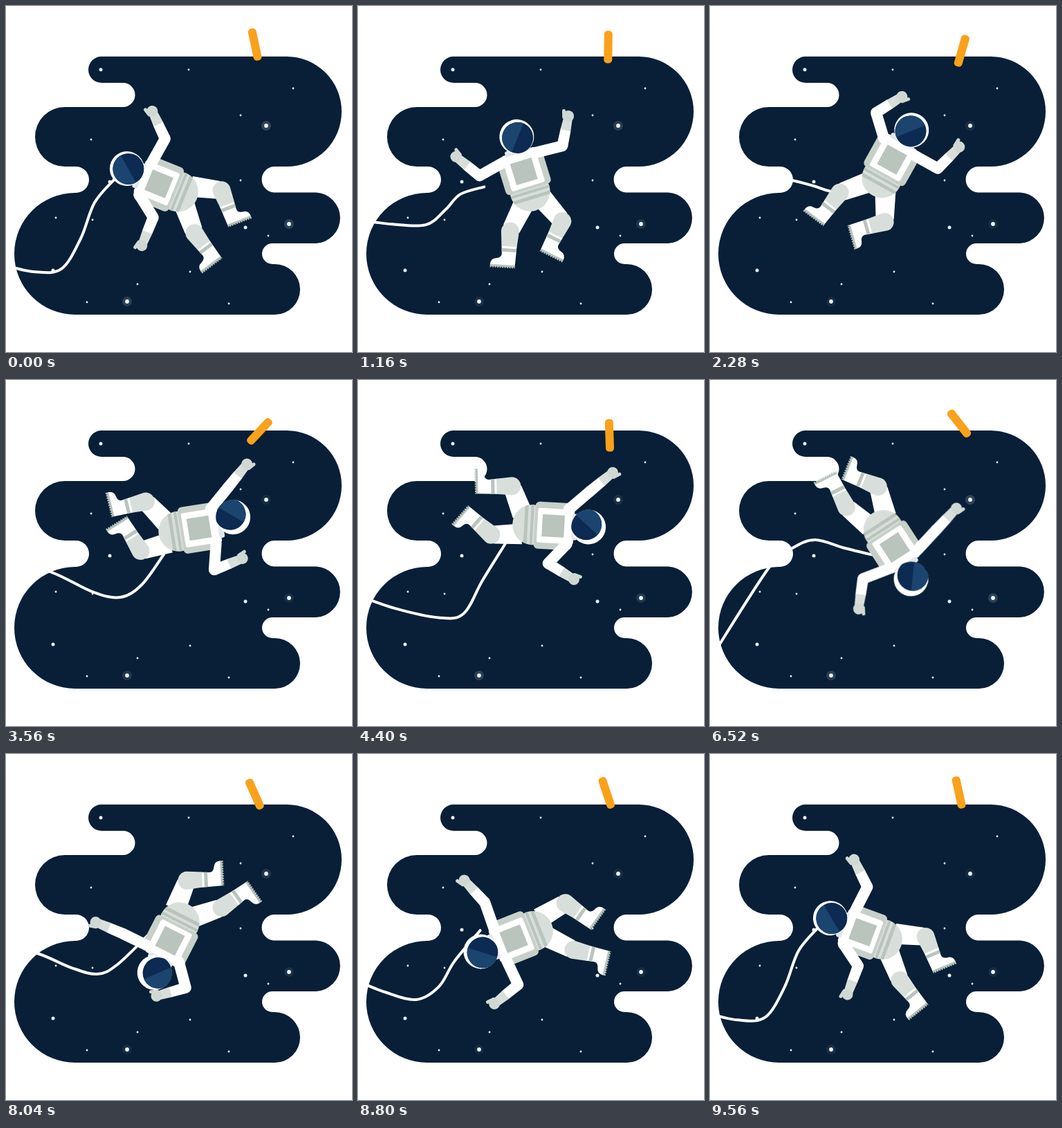
These frames come from a looping animation (500x500 px, 9600 ms). An HTML page:

```html
<!DOCTYPE html>
<html lang="en">
<head>
<meta charset="utf-8">
<title>Floating astronaut</title>
<style>
  html, body { margin: 0; height: 100%; overflow: hidden; background: #fff; }
  svg { display: block; width: 100vw; height: 100vh; }
  .white { fill: #fff; }
  .pale { fill: #d8dfdb; }
  .grey { fill: #b8c4bc; }
  .line { fill: none; stroke: #fff; stroke-linecap: round; stroke-linejoin: round; }
  .halo { fill: #fff; animation: twinkle 3.2s ease-in-out infinite alternate; }
  @keyframes twinkle { from { opacity: .16; } to { opacity: .05; } }
</style>
</head>
<body>
<svg viewBox="0 0 500 500">
  <defs>
    <clipPath id="helmet"><circle r="25"/></clipPath>
    <clipPath id="visor"><circle r="22.5"/></clipPath>
    <clipPath id="hips"><circle cy="30" r="29"/></clipPath>
  </defs>

  <path fill="#081f37" d="M138 73H405.500A79.500 79.500 0 0 1 405.500 232H387A18.800 18.800 0 0 0 387 269.500H448
    A36.800 36.800 0 0 1 448 343H385A15 15 0 0 0 385 373H388.500A36.500 36.500 0 0 1 388.500 446H100
    A88 88 0 0 1 100 270H101A19 19 0 0 0 101 232H85A43 43 0 0 1 85 146H169
    A17.500 17.500 0 0 0 169 111H138A19 19 0 0 1 138 73Z"/>
  <g id="stars"></g>
  <rect id="prize" x="-6" y="-30" width="12" height="47" rx="5" fill="#f9a11b"/>
  <path id="tether" class="line" stroke-width="4"/>

  <g id="body">
    <g id="legs"></g>
    <g clip-path="url(#hips)">
      <rect class="pale" x="-30" y="0" width="60" height="60"/>
      <path class="grey" d="M-30 29h60v4h-60zM-30 37h60v5h-60z"/>
    </g>
    <rect x="-34" y="-27" width="68" height="54" rx="6" fill="#c6d0c9"/>
    <g id="arms"></g>
    <rect class="white" x="-25" y="-30" width="50" height="53" rx="3"/>
    <rect class="grey" x="-16" y="-16" width="32" height="32"/>
    <rect x="-19" y="-35" width="38" height="8" rx="3" fill="#e3e6ec"/>
    <g id="head">
      <circle class="white" r="25"/>
      <g clip-path="url(#helmet)">
        <g id="glass" clip-path="url(#visor)">
          <circle r="23" fill="#0c2a52"/>
          <rect x="-30" y="-60" width="60" height="60" fill="#1b446f" transform="rotate(-51)"/>
        </g>
      </g>
    </g>
  </g>
</svg>

<script>
const LOOP = 9600;
const $ = id => document.getElementById(id);

// Key poses; limb angles are relative to the parent part, right side mirrored.
const beats = [0, 2280, 3560, 5240, 6520, 8040];
const pose = {
  x: [221, 263, 279, 281, 267, 237],
  y: [257, 222, 214, 213, 242, 270],
  turn: [-68, 29, 81, 104, 147, 207],
  headX: [3, 4, -8, 7, 5, -1],
  glassX: [0.4, -0.3, -4.5, -2.5, -5, -5],
  glassY: [2, 2, 3.5, 3.5, 3, 2]
};
const limbs = {
  armL: [[36, 134, 138, 127, 76, 138], [54, 75, 0, 11, 0, 89]],
  armR: [[83, 90, 77, 30, 78, 91], [54, 74, 116, 80, 61, 3]],
  legL: [[48, 41, 55, 68, 18, 44], [-17, -33, -60, -74, -53, -16]],
  legR: [[15, 28, 7, 7, 17, 5], [-62, -73, -74, -13, -23, -65]]
};
const prize = {
  beats: [0, 2280, 3560, 4300, 5240, 6520, 8040],
  x: [361, 362, 362, 363, 365, 364, 362],
  y: [62, 71, 79, 74, 71, 68, 64],
  turn: [-12, 16, 43, 165, 265, 322, 336]
};
// Each tether point: x and y over the beats.
const tether = [
  [[-5, -5, 0, -10, 5, 0], [374, 236, 268, 352, 396, 282]],
  [[40, 60, 61, 50, 86, 45], [384, 240, 276, 365, 270, 288]],
  [[80, 119, 125, 110, 119, 95], [380, 252, 306, 357, 243, 309]],
  [[108, 150, 165, 140, 152, 132], [336, 260, 314, 338, 231, 318]],
  [[128, 175, 196, 165, 195, 160], [284, 268, 296, 275, 243, 305]],
  [[158, 215, 228, 205, 240, 205], [249, 272, 252, 222, 254, 262]]
];

// Periodic cubic through the keys; gain is added once per loop.
function at(values, t, gain = 0, keys = beats) {
  const n = keys.length;
  const wrap = (list, i, step) => list[(i + n) % n] + Math.floor(i / n) * step;
  const T = i => wrap(keys, i, LOOP);
  const V = i => wrap(values, i, gain);
  const slope = i => (V(i + 1) - V(i - 1)) / (T(i + 1) - T(i - 1));
  let i = n - 1;
  while (keys[i] > t) i--;
  const h = T(i + 1) - T(i), u = (t - T(i)) / h, w = 1 - u;
  return w * w * ((1 + 2 * u) * V(i) + u * h * slope(i))
       + u * u * ((3 - 2 * u) * V(i + 1) - w * h * slope(i + 1));
}

function curve(p) {
  let d = `M${p[0]}`;
  for (let i = 0; i < p.length - 1; i++) {
    const a = p[i], b = p[i + 1], prev = p[i - 1] || a, next = p[i + 2] || b;
    const c1 = a.map((v, k) => v + (b[k] - prev[k]) / 6);
    const c2 = b.map((v, k) => v - (next[k] - a[k]) / 6);
    d += `C${c1} ${c2} ${b}`;
  }
  return d;
}

const armShape = id => `
  <g id="${id}0"><path class="line" stroke-width="16" d="M0 0V39"/>
    <g id="${id}1">
      <path class="white" d="M-8 0H8L7.500 24H-7.500z"/>
      <path class="pale" d="M-7.500 23H7.500L6.500 40H-6.500z"/>
      <circle cy="44" r="8" fill="#d0d8d3"/>
      <path d="M-6 41L-8 50" fill="none" stroke="#d0d8d3" stroke-width="5" stroke-linecap="round"/>
    </g>
  </g>`;
const legShape = id => `
  <g id="${id}0"><path class="white" d="M-15 0H15L13 40Q0 46 -13 40z"/>
    <g id="${id}1">
      <path class="pale" d="M-13 0A13 13 0 0 1 13 0L11 23H-11z"/>
      <path class="white" d="M-11 22H11L10 50H-26Q-26 41 -18 40Q-10 39 -10 33z"/>
      <path class="grey" d="M-10.700 25H10.700V30H-10.500z"/>
      <path d="M-26 50.500H10" stroke="#b8c4bc" stroke-width="3"/>
      <path d="M-26 52.500H10" stroke="#b8c4bc" stroke-width="2" stroke-dasharray="2 1.500"/>
    </g>
  </g>`;
const pair = (shape, name) =>
  `<g>${shape(name + "L")}</g><g transform="scale(-1 1)">${shape(name + "R")}</g>`;
$("arms").innerHTML = pair(armShape, "arm");
$("legs").innerHTML = pair(legShape, "leg");

const dot = (x, y, r, extra = "") => `<circle cx="${x}" cy="${y}" r="${r}" ${extra}/>`;
const small = [[264, 92], [415, 119], [339, 158], [123, 193], [339, 252], [72, 306],
  [125, 309], [379, 332], [266, 384], [190, 402], [322, 430], [117, 428]];
const large = [[137, 92], [150, 254], [346, 320], [68, 382]];
const bright = [[376, 173], [409, 315], [175, 427]];
$("stars").innerHTML = `<g fill="#eef2f4">
  ${small.map(([x, y]) => dot(x, y, 1.4)).join("")}
  ${large.map(([x, y]) => dot(x, y, 2.5)).join("")}
  ${bright.map(([x, y], i) =>
    dot(x, y, 7, `class="halo" style="animation-delay:${-i * 0.5}s"`) + dot(x, y, 2.9)).join("")}
</g>`;

const place = (id, x, y, turn = 0) =>
  $(id).setAttribute("transform", `translate(${x} ${y}) rotate(${turn})`);

function draw(now) {
  const t = now % LOOP;
  const p = key => at(pose[key], t);
  place("body", p("x"), p("y"), at(pose.turn, t, 360));
  place("head", p("headX"), -51);
  place("glass", p("glassX"), p("glassY"));
  for (const id in limbs) {
    const [upper, lower] = limbs[id].map(v => at(v, t));
    const arm = id.startsWith("arm");
    place(id + 0, arm ? -25 : -14, arm ? -21 : 45, upper);
    place(id + 1, 0, arm ? 39 : 44, lower);
  }
  const q = (key, gain) => at(prize[key], t, gain, prize.beats);
  place("prize", q("x"), q("y"), q("turn", 360));
  $("tether").setAttribute("d", curve(tether.map(xy => xy.map(v => at(v, t)))));
}

const start = performance.now();
function tick() {
  draw(performance.now() - start);
  requestAnimationFrame(tick);
}
tick();
</script>
</body>
</html>
```
